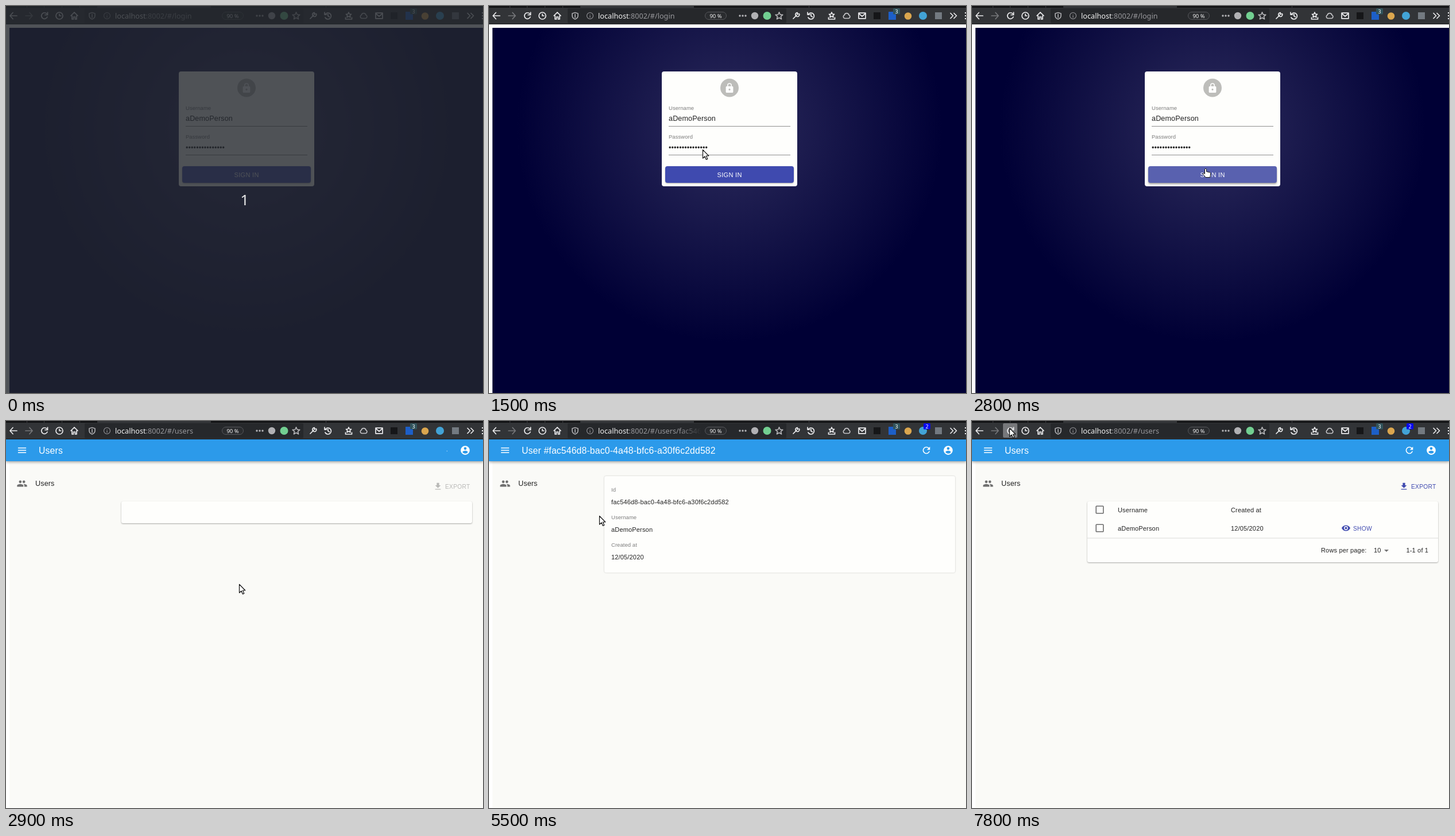
Write an HTML page that moves like this. It is 831x674 px and loops after 8000 ms.

```html
<!DOCTYPE html>
<html lang="en">
<head>
<meta charset="utf-8">
<title>Login and user list</title>
<style>
html, body { margin: 0; width: 100%; height: 100%; overflow: hidden; background: #fff; }
svg { display: block; }
text { font-family: "Liberation Sans", Arial, sans-serif; white-space: pre; }
.ui { font-family: "Noto Sans", sans-serif; }
.input { font-size: 12.6px; letter-spacing: .13px; fill: #222; }
.label { font-size: 9.45px; letter-spacing: .08px; fill: #7c7c7c; }
.cell { font-size: 11.03px; letter-spacing: .16px; fill: #222; }
.title { font-size: 15.75px; letter-spacing: .16px; fill: #fff; }
.button { font-size: 11.03px; letter-spacing: .32px; fill: #fff; }
.small { font-size: 10.24px; letter-spacing: .29px; }
.card { fill: #fefefc; filter: drop-shadow(0 1px 1px rgba(0,0,0,.33)); }
.soft { filter: drop-shadow(0 .6px .9px rgba(0,0,0,.22)); }
.raised { filter: drop-shadow(0 2px 1.8px rgba(0,0,0,.38)); }
.line { fill: none; stroke-width: 1.7; stroke-linecap: round; stroke-linejoin: round; }
</style>
</head>
<body>
<svg id="stage" width="831" height="674" viewBox="0 0 831 674"></svg>
<script>
const LOOP = 8000;
const USER = 'aDemoPerson';
const ID = 'fac546d8-bac0-4a48-bfc6-a30f6c2dd582';
const INDIGO = '#3f4aaf';
const LIGHT = '#ececee';

const rect = (x, y, w, h, fill, extra = '') =>
  `<rect x="${x}" y="${y}" width="${w}" height="${h}" fill="${fill}" ${extra}/>`;
const circle = (x, y, r, fill, extra = '') =>
  `<circle cx="${x}" cy="${y}" r="${r}" fill="${fill}" ${extra}/>`;
const text = (cls, x, y, str, extra = '') =>
  `<text class="${cls}" x="${x}" y="${y}" ${extra}>${str}</text>`;
const ui = (x, y, size, fill, str, extra = '') =>
  text('ui', x, y, str, `font-size="${size}" fill="${fill}" ${extra}`);
// Icons on a 24-unit grid, centred on x, y
const icon = (d, x, y, fill, scale = .7875) =>
  `<path d="${d}" fill="${fill}" fill-rule="evenodd" transform="translate(${x} ${y}) scale(${scale}) translate(-12 -12)"/>`;
// Outline icons drawn around their own centre
const line = (d, x, stroke = LIGHT, y = 17) =>
  `<path class="line" d="${d}" stroke="${stroke}" transform="translate(${x} ${y})"/>`;
// Shown only inside the given time ranges
const during = (ranges, ...parts) => `<g data-on="${ranges}">${parts.join('')}</g>`;

const REFRESH = 'M17.65 6.35A8 8 0 1 0 19.73 14h-2.08A6 6 0 1 1 16.22 7.78L13 11h7V4z';
const PEOPLE = 'M16 11a3 3 0 1 0 0-6 3 3 0 0 0 0 6zM8 11a3 3 0 1 0 0-6 3 3 0 0 0 0 6zm0 2c-2.3 0-7 1.2-7 3.5V19h14v-2.5c0-2.3-4.7-3.5-7-3.5zm8 0l-1 .05c1.2.85 2 2 2 3.45V19h6v-2.5c0-2.3-4.7-3.5-7-3.5z';
const ACCOUNT = 'M12 2a10 10 0 1 0 0 20 10 10 0 0 0 0-20zm0 3a3 3 0 1 1 0 6 3 3 0 0 1 0-6zm0 14.2c-2.5 0-4.7-1.3-6-3.2 0-2 4-3.1 6-3.1s6 1.1 6 3.1a7.2 7.2 0 0 1-6 3.2z';
const LOCK = 'M18 8h-1V6A5 5 0 0 0 7 6v2H6a2 2 0 0 0-2 2v10a2 2 0 0 0 2 2h12a2 2 0 0 0 2-2V10a2 2 0 0 0-2-2zm-6 9a2 2 0 1 1 0-4 2 2 0 0 1 0 4zm3.1-9H8.9V6a3.1 3.1 0 0 1 6.2 0z';
const EYE = 'M12 4.5C7 4.5 2.7 7.6 1 12c1.7 4.4 6 7.5 11 7.5s9.3-3.1 11-7.5c-1.7-4.4-6-7.5-11-7.5zM12 17a5 5 0 1 1 0-10 5 5 0 0 1 0 10zm0-8a3 3 0 1 0 0 6 3 3 0 0 0 0-6z';
const DOWNLOAD = 'M19 9h-4V3H9v6H5l7 7zM5 18v2h14v-2z';
const MENU = 'M3 18h18v-2H3zm0-5h18v-2H3zm0-7v2h18V6z';
const BOX = 'M19 5v14H5V5zm0-2H5a2 2 0 0 0-2 2v14a2 2 0 0 0 2 2h14a2 2 0 0 0 2-2V5a2 2 0 0 0-2-2z';
const STAR = 'M0-6.2L1.8-2 6.3-1.7 2.9 1.3 4 5.8 0 3.4-4 5.8-2.9 1.3-6.3-1.7-1.8-2z';

const url = path => ui(190, 21.5, 12.7, '#98989c',
  `<tspan fill="#f2f2f2">localhost</tspan>:8002/#/${path}`);
const badge = (x, fill, count) =>
  rect(x - 6, 4, 12, 10.5, fill, 'rx="1.5"') + ui(x, 12.8, 9, '#fff', count, 'text-anchor="middle"');

const toolbar = [
  rect(0, 0, 831, 32, '#323437'),
  rect(0, 0, 831, 3, '#111214'),
  rect(159, 0, 198, 3, '#323437'),
  [36, 66, 97, 128, 557].map(x => rect(x, 0, 1, 3, '#3a3a3d')).join(''),
  rect(137, 4, 381, 26, '#26282b', 'rx="2"'),
  rect(0, 31, 831, 1, '#1b1c1e'),
  line('M6 0H-6M-1-5.5L-6 0-1 5.5', 13),
  line('M-6 0H6M1-5.5L6 0 1 5.5', 40, '#77787b'),
  during('7700-8000', rect(54, 4, 25, 25, '#77787b', 'rx="2"')),
  line('M5 2A5.3 5.3 0 1 1 4-3.5M5.5-6V-1.5H1', 67),
  line('M6 0A6 6 0 1 1-6 0 6 6 0 1 1 6 0M0-3V0H2.8', 93),
  line('M-6 0L0-6 6 0M-4 0V6H-1.5V2H1.5V6H4V0', 119),
  line('M0-5.5L5-4V0C5 3 2.5 5 0 6-2.5 5-5 3-5 0V-4zM0-2.5V3', 150, '#a9a9ac'),
  line('M5.5 0A5.5 5.5 0 1 1-5.5 0 5.5 5.5 0 1 1 5.5 0M0-.5V3M0-2.8V-2.7', 176, '#98989c" style="stroke-width:1.1'),
  during('0-2900', url('login')),
  during('2900-4900,6300-8000', url('users')),
  during('4900-6300', url('users/fac546'), rect(332, 6, 42, 22, 'url(#urlFade)')),
  rect(376.5, 10.5, 37, 13, '#2a2c2f', 'rx="6.5" stroke="#57585c"'),
  ui(395, 20.5, 9.5, '#f2f2f2', '90 %', 'text-anchor="middle"'),
  [437, 442, 447].map(x => circle(x, 17, 1.7, '#b4b4b7')).join(''),
  circle(463, 17, 6.2, '#b1b1b4'),
  circle(484.5, 17, 7, '#72cf91'),
  line(STAR, 505.5, '#b4b4b7'),
  line('M-5 5L1-1', 535) + line('M5-3.5A3.5 3.5 0 1 1 2-5.5L1.5-2.5z', 535.5),
  line('M-5-2A5.5 5.5 0 1 1-5 3M-6-6V-2H-2M0-3V.5L2.5 2', 561),
  line('M0-6L1.3-3 4.5-2.7 2.2-.5 3 2.7 0 1-3 2.7-2.2-.5-4.5-2.7-1.3-3zM-5.5 3V6H5.5V3', 597),
  line('M-3.5 4.5A3 3 0 0 1-3.8-1.2 4 4 0 0 1 4-1.2 3 3 0 0 1 3.7 4.5z', 623, '#c4c4c7'),
  line('M-6-4.8H6V4.8H-6zM-6-4L0 1 6-4', 650),
  rect(670, 11, 12, 12, '#151618'),
  rect(696, 10, 13, 14, '#1d5fc8'),
  badge(710, '#31545c', '3'),
  circle(730, 17.5, 6.3, '#dba64e'),
  circle(756, 17, 7, '#42a3d6'),
  during('3300-8000', badge(763, '#0808ef', '2')),
  rect(777, 11, 12, 12, '#737a81'),
  line('M-5-4.5L-.5 0-5 4.5M1-4.5L5.5 0 1 4.5', 809),
  [12, 17, 22].map(y => rect(829, y - 1, 2, 2, LIGHT)).join(''),
].join('');

const signIn = (cls, fill) =>
  rect(307, 279, 224, 29, '', `class="${cls}" rx="4" style="fill:${fill}"`);

const login = during('0-2900',
  rect(6, 38, 825, 636, 'url(#night)'),
  rect(301, 114, 236, 200, '#fefefc', 'rx="4"'),
  circle(419, 142.5, 16, '#bdbdba'),
  icon(LOCK, 419, 143, '#fff', .8),
  text('label', 313, 180.5, 'Username'),
  text('input', 313, 200, USER),
  rect(313, 209, 212, 1, '#8f8f8f'),
  text('label', 313, 231, 'Password'),
  text('input', 313, 251, '•'.repeat(15)),
  rect(313, 259, 212, 1, '#8f8f8f'),
  during('0-1600', signIn('card', INDIGO)),
  during('1600-1700', signIn('card', '#3842a5')),
  during('1700-2900', signIn('raised', '#303a9b')),
  `<g clip-path="url(#buttonClip)">${circle(407, 286, 0, '#fff', 'id="buttonRipple" opacity=".2"')}</g>`,
  text('button', 397.5, 297.5, 'SIGN IN'),
);

const exportButton = color =>
  icon(DOWNLOAD, 752.5, 114, color, .7) + text('small', 765, 118, 'EXPORT', `fill="${color}"`);

const app = during('2900-8000',
  rect(6, 32, 825, 641, '#fafaf7'),
  rect(0, 32, 831, 38, '#2c9aea', 'style="filter:drop-shadow(0 2px 2px rgba(0,0,0,.33))"'),
  icon(MENU, 28, 51, '#fff'),
  icon(ACCOUNT, 800, 51, '#fff'),
  during('2900-5000,6400-8000', text('title', 57, 57, 'Users')),
  during('5000-6400', text('title', 57, 57, 'User #' + ID)),
  during('3300-5000,5200-6400,6600-8000', icon(REFRESH, 762, 51, '#fff')),
  during('2900-3300,5000-5200,6400-6600',
    circle(762, 51, 6.5, 'none', 'id="spinner" stroke="#fff" stroke-width="1.2"')),
  `<g clip-path="url(#menuClip)">${circle(63, 109, 0, '#000', 'id="menuRipple" opacity=".18"')}</g>`,
  icon(PEOPLE, 28, 109, '#707070'),
  text('input', 51, 113, 'Users'),
  during('2900-3300', exportButton('#b9b9b7'),
    rect(201, 140, 611, 38, '', 'class="card" rx="3"')),
  during('3300-5000,6400-8000', exportButton(INDIGO),
    rect(201, 140, 611, 106, '', 'class="card" rx="3"'),
    icon(BOX, 222.5, 154.5, '#6b6b6b'),
    icon(BOX, 222.5, 186.5, '#6b6b6b'),
    text('cell', 254, 158.5, 'Username'),
    text('cell', 451, 158.5, 'Created at'),
    text('cell', 254, 191, USER),
    text('cell', 451, 191, '12/05/2020'),
    icon(EYE, 651.5, 186.5, INDIGO, .68),
    text('small', 664, 190.5, 'SHOW', `fill="${INDIGO}"`),
    rect(201, 203.5, 611, 1, '#dededc'),
    text('cell', 608, 229, 'Rows per page:'),
    text('cell', 700, 229, '10'),
    '<path d="M718 224h8l-4 4z" fill="#757575"/>',
    text('cell', 756.5, 229, '1-1 of 1')),
  during('5000-6400',
    rect(201, 96, 611, 168, '', 'class="card soft" rx="3"'),
    [['Id', ID], ['Username', USER], ['Created at', '12/05/2020']].map(([name, value], i) =>
      text('label', 213, 123 + 47.8 * i, name) + text('cell', 213, 145 + 47.8 * i, value)).join('')),
);

const status = (width, path) =>
  rect(0, 653, width, 21, '#38383d') + ui(5, 668, 11.5, '#f2f2f2', 'localhost:8002/#/' + path);

const overlays = [
  during('4500-5000', status(396, `users/${ID}/show`)),
  during('5800-6400', status(136, 'users')),
  during('2200-2300', rect(407, 304, 88, 25, '#3c3d3d'),
    ui(413.5, 321, 12.5, '#fff', 'React Admin')),
  `<g id="cursor" stroke="#111" stroke-linejoin="round" fill="#fff">
    <path id="arrow" d="M.5.5V15.2L4 12 6.4 17.5 8.8 16.4 6.4 11H10.8z" stroke-width="1.2"/>
    <path id="hand" d="M-1.5 1.2Q0-1 1.5 1.2V5.5L7.5 6.8Q9 7.3 8.8 9L7.6 15.5H0L-4.8 9.3Q-4.5 7.3-2.8 8L-1.5 9.5z"/>
  </g>`,
  during('0-400', rect(0, 0, 831, 674, 'rgba(36,39,46,.8)'),
    ui(415.7, 347, 26, '#e8e8e8', '1', 'text-anchor="middle"')),
].join('');

const stage = document.getElementById('stage');
stage.innerHTML = `<defs>
  <radialGradient id="night" gradientUnits="userSpaceOnUse" cx="419" cy="214" r="371">
    <stop stop-color="#2c2b5c"/><stop offset="1" stop-color="#000035"/></radialGradient>
  <linearGradient id="urlFade"><stop stop-color="#26282b" stop-opacity="0"/>
    <stop offset=".9" stop-color="#26282b"/></linearGradient>
  <clipPath id="buttonClip">${rect(307, 279, 224, 29, '#000', 'rx="4"')}</clipPath>
  <clipPath id="menuClip">${rect(6, 95, 190, 29, '#000')}</clipPath>
</defs>${rect(0, 0, 831, 674, '#fff')}${login}${app}${toolbar}${overlays}`;

// Pointer stops: time, x, y, 1 for the hand
const pointer = [
  [900, 350, 141], [1100, 295, 95], [1200, 251, 69], [1300, 301, 149],
  [1500, 372, 250], [1600, 407, 283, 1], [2900, 406, 284],
  [4100, 450, 262], [4200, 530, 232], [4300, 620, 200], [4400, 671, 184, 1],
  [5000, 671, 182], [5400, 430, 175], [5500, 192, 165], [5600, 110, 130],
  [5700, 66, 109, 1], [5800, 63, 107, 1],
  [6900, 80, 85], [7000, 50, 57], [7100, 22, 96],
  [7300, 40, 80], [7400, 80, 60], [7500, 93, 40], [7600, 80, 25],
  [7700, 68, 14], [7800, 65, 12],
];

const timed = [...stage.querySelectorAll('[data-on]')].map(node => ({
  node, ranges: node.dataset.on.split(',').map(range => range.split('-').map(Number)),
}));
const [cursor, arrow, hand, buttonRipple, menuRipple, spinner] =
  ['cursor', 'arrow', 'hand', 'buttonRipple', 'menuRipple', 'spinner']
    .map(id => document.getElementById(id));
const show = (node, on) => { node.style.display = on ? '' : 'none'; };
const ease = t => t * t * (3 - 2 * t);

function spread(ripple, elapsed, life) {
  show(ripple, elapsed >= 0 && elapsed < life);
  ripple.setAttribute('r', 150 * ease(Math.max(0, Math.min(1, elapsed / 550))));
}

function spin(elapsed) {
  const length = .8 + 32 * ease(elapsed / 700);
  spinner.setAttribute('stroke-dasharray', `${length} 50`);
  spinner.setAttribute('transform', `rotate(${8 + elapsed / 1400 * 360} 762 51)`);
}

function draw() {
  const now = performance.now() % LOOP;
  const step = Math.floor(now / 100) * 100;
  for (const { node, ranges } of timed) {
    show(node, ranges.some(([from, to]) => now >= from && now < to));
  }

  const stop = pointer.filter(([time]) => time <= now).pop();
  show(cursor, stop);
  if (stop) {
    const [, x, y, isHand] = stop;
    cursor.setAttribute('transform', `translate(${x} ${y})`);
    show(arrow, !isHand);
    show(hand, isHand);
  }

  spread(buttonRipple, step - 2200, 700);
  spread(menuRipple, step - 6200, 500);
  // The page stalls while the list loads, so the spinner only turns once
  spin(step >= 3000 && step < 3300 ? 100 : 0);
  requestAnimationFrame(draw);
}
draw();
</script>
</body>
</html>
```
